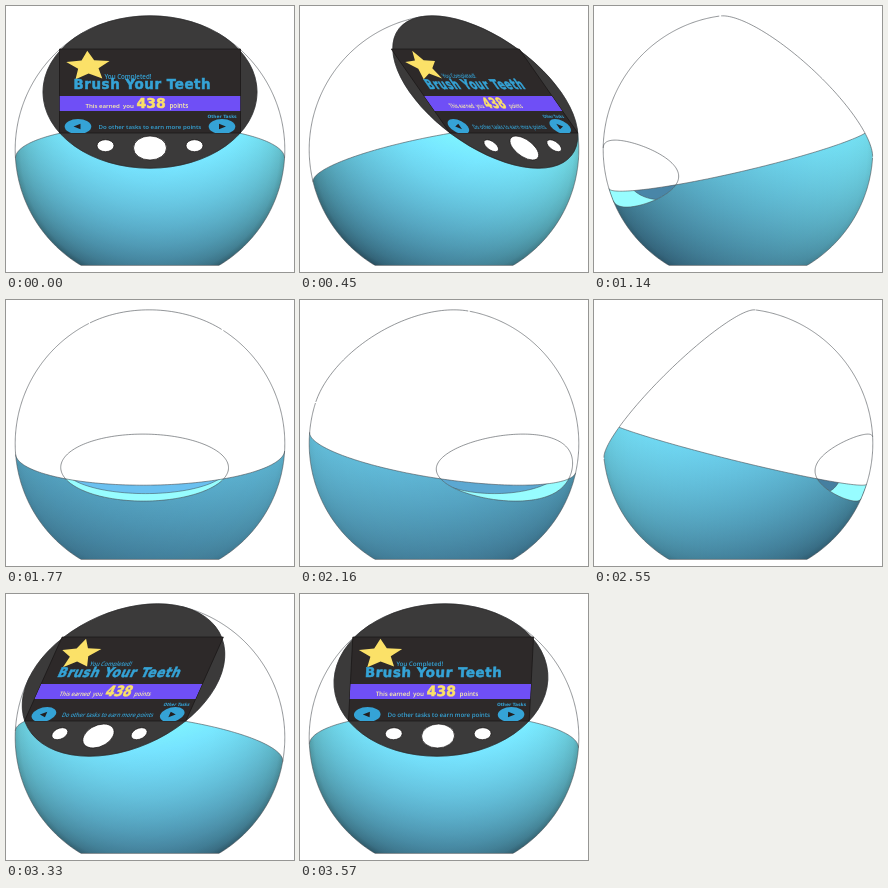
An HTML page for the animation above (3.6 s loop, 288x266 px).

```html
<!DOCTYPE html>
<html lang="en">
<head>
<meta charset="utf-8">
<title>Task speaker turntable</title>
<style>
  html, body { margin: 0; width: 100%; height: 100%; overflow: hidden; background: #fff; }
  svg { display: block; width: 288px; height: 266px; }
  .line { fill: none; stroke: #4a5054; stroke-width: .6; }
  .thin { vector-effect: non-scaling-stroke; }
  text { font-family: "Open Sans", "Noto Sans", sans-serif; font-weight: 600; white-space: pre; }
  .bold { font-family: "DejaVu Sans", sans-serif; font-weight: bold; }
  .heavy { stroke: currentColor; fill: currentColor; stroke-width: .55; }
  #glow { mix-blend-mode: plus-lighter; }
</style>
</head>
<body>
<svg viewBox="0 0 288 266">
  <defs>
    <linearGradient id="shade" gradientUnits="userSpaceOnUse">
      <stop id="dark" offset="0"/><stop id="light" offset="1"/>
    </linearGradient>
    <radialGradient id="bulge" gradientUnits="userSpaceOnUse" cx="144" cy="143.6" r="134.8"></radialGradient>
    <clipPath id="nearClip"><path id="near"/></clipPath>
    <clipPath id="screenClip"><rect x="53" y="43" width="181" height="84"/></clipPath>
  </defs>

  <path id="body" fill="url(#shade)"/>
  <path id="glow" fill="url(#bulge)"/>
  <g id="pocket" clip-path="url(#nearClip)">
    <rect width="288" height="266" fill="#97fdff"/>
    <path id="wall" stroke="#3c4348" stroke-width=".5"/>
  </g>
  <path id="upper" fill="#fff"/>

  <path id="outline" class="line"/>
  <path id="seam" class="line"/>
  <path id="rim" class="line"/>
  <path id="faceRim" class="line"/>

  <g id="face">
    <ellipse cx="143.5" cy="86" rx="107" ry="76.2" fill="#3b3a3a" stroke="#1c1a1a" stroke-width=".5" class="thin"/>
    <rect x="53" y="43" width="181" height="84" fill="#2d2929" stroke="#171515" stroke-width=".7" class="thin"/>
    <g clip-path="url(#screenClip)">
      <path id="star" fill="#fbe168"/>
      <g fill="#35a3d6" color="#35a3d6">
        <text x="98" y="72.5" font-size="6.2">You Completed!</text>
        <text x="67" y="83.3" font-size="13.4" letter-spacing=".58" class="bold heavy">Brush Your Teeth</text>
        <text x="201" y="112" font-size="4.4" class="bold">Other Tasks</text>
        <text x="92" y="122.7" font-size="6.1">Do other tasks to earn more points</text>
        <ellipse cx="71.5" cy="120.5" rx="13.3" ry="7.5"/>
        <ellipse cx="215.5" cy="120.5" rx="13.3" ry="7.5"/>
      </g>
      <path d="M67 120.5l7-2.7v5.4zM219.5 120.5l-7-2.7v5.4z" fill="#231f20"/>
      <rect x="53" y="90" width="181" height="15" fill="#6f4ff6"/>
      <g fill="#fff3a8">
        <text x="79" y="102.3" font-size="6.1">This earned  you</text>
        <text x="163" y="102.3" font-size="6.2">points</text>
      </g>
      <text x="130" y="102.2" font-size="14" class="bold heavy" color="#fbe168">438</text>
    </g>
    <g fill="#fff" stroke="#161414" stroke-width=".7">
      <ellipse cx="99" cy="139.7" rx="8.5" ry="6" class="thin"/>
      <ellipse cx="143.5" cy="142" rx="16.5" ry="12" class="thin"/>
      <ellipse cx="188" cy="139.7" rx="8.5" ry="6" class="thin"/>
    </g>
  </g>
</svg>
<script>
const LOOP = 3600, STEP = 30, TAU = 2 * Math.PI;
const CX = 144, CY = 143.6, R = 134.8, BASE = -115.8;
const TILT = 44.6 * Math.PI / 180, ST = Math.sin(TILT), CT = Math.cos(TILT);
const FACE_R = 107, FACE_D = Math.sqrt(R * R - FACE_R * FACE_R);
const SEAM_A = -8.9, SEAM_B = .255;
const HOLE = { rx: 84, ry: 33.5, y: -24 };

const el = id => document.getElementById(id);
const set = (id, d) => el(id).setAttribute("d", d);
const ring = (n, fn) => Array.from({ length: n }, (_, i) => fn(Math.cos(i / n * TAU), Math.sin(i / n * TAU)));

// Object space: x right, y up, z toward the front of the device.
const faceRing = ring(180, (c, s) => [FACE_R * c, FACE_D * ST + FACE_R * s * CT, FACE_D * CT - FACE_R * s * ST]);
const holeRing = ring(180, (c, s) => {
  const x = HOLE.rx * c, y = HOLE.y + HOLE.ry * s;
  return [x, y, -Math.sqrt(R * R - x * x - y * y)];
});
const wallRing = ring(120, (c, s) => [82 * c, HOLE.y + 26 * s, -86]);
const tiltLen = Math.hypot(1, SEAM_B), seamD = SEAM_A / tiltLen;
const seamR = Math.sqrt(R * R - seamD * seamD);
const seamRing = ring(240, (c, s) => [
  seamR * c,
  seamD / tiltLen + seamR * s * SEAM_B / tiltLen,
  -seamD * SEAM_B / tiltLen + seamR * s / tiltLen
]);

const beyondFace = ([, y, z]) => y * ST + z * CT > FACE_D + .3;

// Turned copies keep the object-space point in p.
function turn(pts, c, s) {
  return pts.map(p => ({ p, x: CX + p[0] * c + p[2] * s, y: CY - p[1], z: p[2] * c - p[0] * s }));
}
const xy = q => q.x.toFixed(2) + " " + q.y.toFixed(2);
const area = pts => pts.length ? "M" + pts.map(xy).join("L") + "Z" : "";

// Start the ring just after a failing point, so a passing run is unbroken.
function rotate(pts, test) {
  const i = pts.findIndex(q => !test(q));
  return i < 0 ? pts : pts.slice(i).concat(pts.slice(0, i));
}
function strokePath(pts, test) {
  if (pts.every(test)) return area(pts);
  let d = "", pen = false;
  for (const q of rotate(pts, test)) {
    const ok = test(q);
    if (ok) d += (pen ? "L" : "M") + xy(q);
    pen = ok;
  }
  return d;
}

// Close an open run along the sphere's silhouette.
function closeOnSphere(pts) {
  const a = pts[pts.length - 1], b = pts[0];
  const sweep = (a.x - CX) * (b.y - CY) - (a.y - CY) * (b.x - CX) > 0 ? 1 : 0;
  return `M${pts.map(xy).join("L")}A${R} ${R} 0 0 ${sweep} ${xy(b)}Z`;
}

const mix = (a, b, k) => "rgb(" + a.map((v, i) => Math.round(v + (b[i] - v) * k)) + ")";
const blue = g => "rgb(" + [.52, 1, 1.23].map(k => Math.min(255, Math.round(g * k))) + ")";

// Brightness is linear in the surface normal: a linear ramp plus a round glow.
const bulge = el("bulge");
const stops = [0, .25, .45, .6, .72, .82, .9, .96, 1].map(r => {
  const stop = document.createElementNS("http://www.w3.org/2000/svg", "stop");
  stop.setAttribute("offset", r);
  bulge.append(stop);
  return { stop, nz: Math.sqrt(1 - r * r) };
});
function shade(c, s) {
  const lx = 8 + 32 * s, ly = 74 + 14 * c, lz = 50 + 25 * c, len = Math.hypot(lx, ly);
  const dx = lx / len * R, dy = ly / len * R;
  const ends = { x1: CX - dx, y1: CY + dy, x2: CX + dx, y2: CY - dy };
  for (const k in ends) el("shade").setAttribute(k, ends[k]);
  el("dark").setAttribute("stop-color", blue(165 - len));
  el("light").setAttribute("stop-color", blue(165 + len));
  stops.forEach(({ stop, nz }) => stop.setAttribute("stop-color", blue(lz * nz)));
}

function draw(angle) {
  const c = Math.cos(angle), s = Math.sin(angle), front = c > 0;
  const shown = q => q.z >= 0;

  const disc = ring(720, (a, b) => {
    const X = R * a, Y = R * b;
    return { p: [X * c, Y, X * s], x: CX + X, y: CY - Y, z: 0 };
  });
  const solid = q => !beyondFace(q.p) && q.p[1] >= BASE;
  const face = turn(faceRing, c, s);
  const body = area(disc.filter(solid)) + area(front ? face : face.slice().reverse());
  set("body", body);
  set("glow", body);
  shade(c, s);
  set("outline", strokePath(disc, solid) + "M75 259.4H213");
  set("faceRim", strokePath(face, q => front || q.z >= 0));

  const seam = turn(seamRing, c, s);
  const arc = rotate(seam, shown).filter(shown);
  const a = arc[0], b = arc[arc.length - 1];
  const side = q => q.x > CX ? 310 : -20;
  set("upper", area([...arc, { x: side(b), y: b.y }, { x: side(b), y: -20 },
    { x: side(a), y: -20 }, { x: side(a), y: a.y }]));
  set("seam", strokePath(seam, q => q.z >= 0 && !beyondFace(q.p)));

  const rim = turn(holeRing, c, s);
  const edge = rotate(rim, shown).filter(shown);
  const open = edge.length > 1;
  el("pocket").style.display = open ? "" : "none";
  set("near", !open ? "" : edge.length === rim.length ? area(rim) : closeOnSphere(edge));
  set("rim", strokePath(rim, shown));
  set("wall", front ? "" : area(turn(wallRing, c, s)));
  el("wall").setAttribute("fill", mix([66, 122, 154], [106, 192, 240], c * c));

  el("face").style.display = front ? "" : "none";
  const skew = s * ST / CT, mid = CY - FACE_D * ST;
  el("face").setAttribute("transform",
    `matrix(${c} 0 ${skew} 1 ${CX - 143.5 * c + s * FACE_D * CT - skew * mid} 0)`);
}

set("star", area(ring(10, (c, s) => ({ c, s })).map((q, i) => {
  const k = i % 2 ? .47 : 1, t = i / 10 * TAU - .04;
  return { x: 81.7 + 22.8 * k * Math.sin(t), y: 60.3 - 15.5 * k * Math.cos(t) };
})));

function tick() {
  const t = performance.now() % LOOP;
  draw(Math.floor(t / STEP) * STEP / LOOP * TAU);
  requestAnimationFrame(tick);
}
tick();
</script>
</body>
</html>
```
